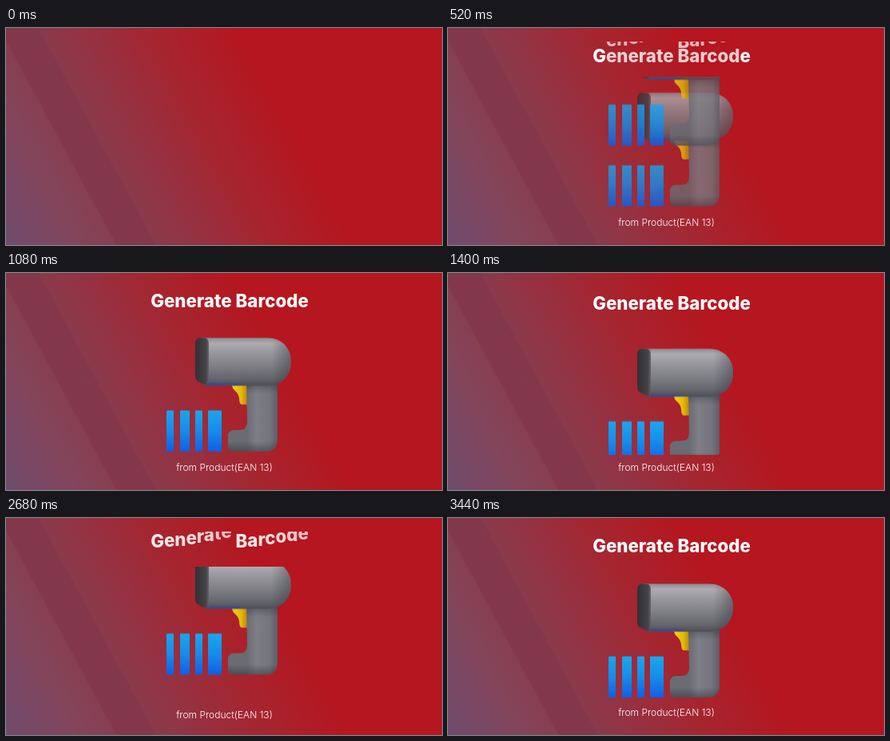
Recreate the animation shown at these times as an HTML page with a canvas. Size 546 by 272 pixels, loop 3.46 s.

```html
<!DOCTYPE html>
<html lang="en">
<head>
<meta charset="utf-8">
<title>Generate Barcode</title>
<style>
  html, body { margin: 0; width: 100%; height: 100%; overflow: hidden; background: #b5161f; }
  canvas { display: block; width: 546px; height: 272px; }
</style>
</head>
<body>
<canvas id="stage"></canvas>
<script>
const W = 546, H = 272, LOOP = 3460;
const dpr = window.devicePixelRatio || 1;
const TITLE = 'Generate Barcode', SUB = 'from Product(EAN 13)';

function setup(canvas) {
  canvas.width = W * dpr;
  canvas.height = H * dpr;
  const c = canvas.getContext('2d');
  c.scale(dpr, dpr);
  return c;
}
const ctx = setup(document.getElementById('stage'));
const clamp = x => Math.max(0, Math.min(1, x));

function gradient(c, x0, y0, x1, y1, stops) {
  const g = c.createLinearGradient(x0, y0, x1, y1);
  for (const [p, color] of stops) g.addColorStop(p, color);
  return g;
}

const backdrop = gradient(ctx, 0, 272, 338.3, 89.3, [
  [0, '#704c6e'], [.2, '#82455c'], [.313, '#883f52'], [.32, '#82384a'],
  [.425, '#84374a'], [.435, '#8a3a4b'], [.565, '#963141'], [.748, '#a6252f'], [1, '#b5161f']
]);

// Scanner and bars, drawn once on their own layer
function drawArt(c) {
  const fill = (path, style) => { c.fillStyle = style; c.fill(new Path2D(path)); };
  const shade = 'rgba(40,40,48,', clear = shade + '0)';
  const blue = gradient(c, 0, 174, 0, 225, [[0, '#1ba6ee'], [.5, '#158ceb'], [1, '#0f5fe6']]);
  c.fillStyle = blue;
  for (const [x, w] of [[201, 9], [218, 12], [237, 9], [253, 17]]) {
    c.beginPath();
    c.roundRect(x, 173.5, w, 51.5, 1);
    c.fill();
  }
  fill('M283 140H302V166H295Q292 165 292 158Q291 152 286 148Q283 145 283 140Z',
    gradient(c, 284, 0, 302, 0, [[0, '#f2cf18'], [.6, '#e3b80c'], [1, '#b98a08']]));
  const grip = 'M301 136H340V210Q340 225 325 225H285Q278 225 278 218V206Q278 198 286 198H292Q302 198 302 188Z';
  fill(grip, gradient(c, 302, 0, 340, 0,
    [[0, '#6b6c73'], [.3, '#7d7e86'], [.75, '#74757c'], [1, '#5d5e65']]));
  fill(grip, gradient(c, 0, 140, 0, 225,
    [[0, shade + '.35)'], [.15, clear], [.85, clear], [1, shade + '.45)']]));
  fill('M245 82.5H327C346 82.5 357 96 357 112.5S346 142.5 327 142.5H248Z',
    gradient(c, 0, 82, 0, 143,
      [[0, '#8b8a90'], [.12, '#aeacb1'], [.3, '#9a999f'], [.6, '#7e7e85'], [.85, '#65656c'], [1, '#4c4c55']]));
  fill('M327 82.5C346 82.5 357 96 357 112.5S346 142.5 327 142.5Z',
    gradient(c, 332, 0, 357, 0, [[0, clear], [1, shade + '.4)']]));
  fill('M250 139.5H296L290 141.5H252Z', 'rgba(42,70,190,.7)');
  fill('M243 82.5H249Q254 83 254 90V134Q254 141 250 141.5L242 138Q237 136 237 130V90Q237 82.5 243 82.5Z',
    gradient(c, 237, 0, 254, 0, [[0, '#303034'], [.8, '#454449'], [1, '#66656a']]));
}
const art = document.createElement('canvas');
drawArt(setup(art));

// Drop from above with a soft overshoot: [ms, share of the travel]
const KEYS = [[0, -1], [120, -.9], [260, -.468], [340, -.174], [440, .02], [530, .075],
  [640, .05], [760, .006], [830, -.008], [960, -.006], [1100, 0]];

function drop(s) {
  if (s <= 0) return -1;
  if (s >= 1100) return 0;
  const i = KEYS.findIndex(k => k[0] > s) - 1;
  const [a, b] = [KEYS[i], KEYS[i + 1]];
  const slope = n => {
    const p = KEYS[Math.max(0, n - 1)], q = KEYS[Math.min(KEYS.length - 1, n + 1)];
    return (q[1] - p[1]) / (q[0] - p[0]);
  };
  const d = b[0] - a[0], u = (s - a[0]) / d, v = 1 - u;
  return a[1] * v * v * (1 + 2 * u) + b[1] * u * u * (3 - 2 * u)
    + d * (slope(i) * u * v * v - slope(i + 1) * u * u * v);
}

function clipped(y0, y1, draw) {
  ctx.save();
  ctx.beginPath();
  ctx.rect(0, y0, W, y1 - y0);
  ctx.clip();
  draw();
  ctx.restore();
}

function picture(s, alpha) {
  if (s <= 0 || alpha <= 0) return;
  clipped(61, 228, () => {
    ctx.globalAlpha = alpha;
    ctx.drawImage(art, 0, 167 * drop(s), W, H);
  });
}

// Letters follow each other within each word and fade in on the way
function title(s, alpha, pick) {
  if (s <= 0 || alpha <= 0) return;
  clipped(17, 46.5, () => {
    ctx.font = '800 22.3px Inter, sans-serif';
    ctx.fillStyle = '#fff';
    const left = 280 - ctx.measureText(TITLE).width / 2;
    let order = 0;
    [...TITLE].forEach((ch, i) => {
      if (ch === ' ') { order = 0; return; }
      const x = left + ctx.measureText(TITLE.slice(0, i + 1)).width - ctx.measureText(ch).width;
      const shift = drop(s + 15 - 11 * order);
      if (pick(i)) {
        ctx.globalAlpha = alpha * clamp(1 + .7 * shift);
        ctx.fillText(ch, x, 43 + 44 * shift);
      }
      order++;
    });
  });
}
const isEnd = i => i === 0 || i === TITLE.length - 1;
const isInner = i => !isEnd(i);

function subtitle(s) {
  if (s <= 0) return;
  clipped(234, 260, () => {
    ctx.font = '300 12px Inter, sans-serif';
    ctx.fillStyle = '#fff';
    const x = 273.5 - ctx.measureText(SUB).width / 2;
    ctx.fillText(SUB, x, 248 + 46 * drop(s + 200));
  });
}

function render(t) {
  ctx.fillStyle = backdrop;
  ctx.fillRect(0, 0, W, H);
  if (t < 1960) {
    const first = (t - 40) * 1.75, second = Math.min(t - 260, 1960 - t);
    const mix = clamp((t - 440) / 160);
    const fadeOut = clamp(1.6 * (1 - mix)), fadeIn = clamp(1.6 * mix);
    const outer = Math.min(first, 1960 - t);
    picture(first, fadeOut);
    picture(second, fadeIn);
    title(first, fadeOut, isInner);
    title(second, clamp(2 * mix), isInner);
    title(outer, 1, isEnd);
    subtitle(outer);
  } else if (t >= 2340) {
    const s = t - 2340;
    const echo = clamp(Math.min(t - 2860, 3100 - t) / 80);
    picture(s, 1);
    title(s - 60 * echo, 1 - .35 * echo, isInner);
    title(t - 2675, echo, isInner);
    title(s, 1, isEnd);
    subtitle(s);
  }
}

const start = performance.now();
function tick() {
  render((performance.now() - start) % LOOP);
  requestAnimationFrame(tick);
}
tick();
</script>
</body>
</html>
```
